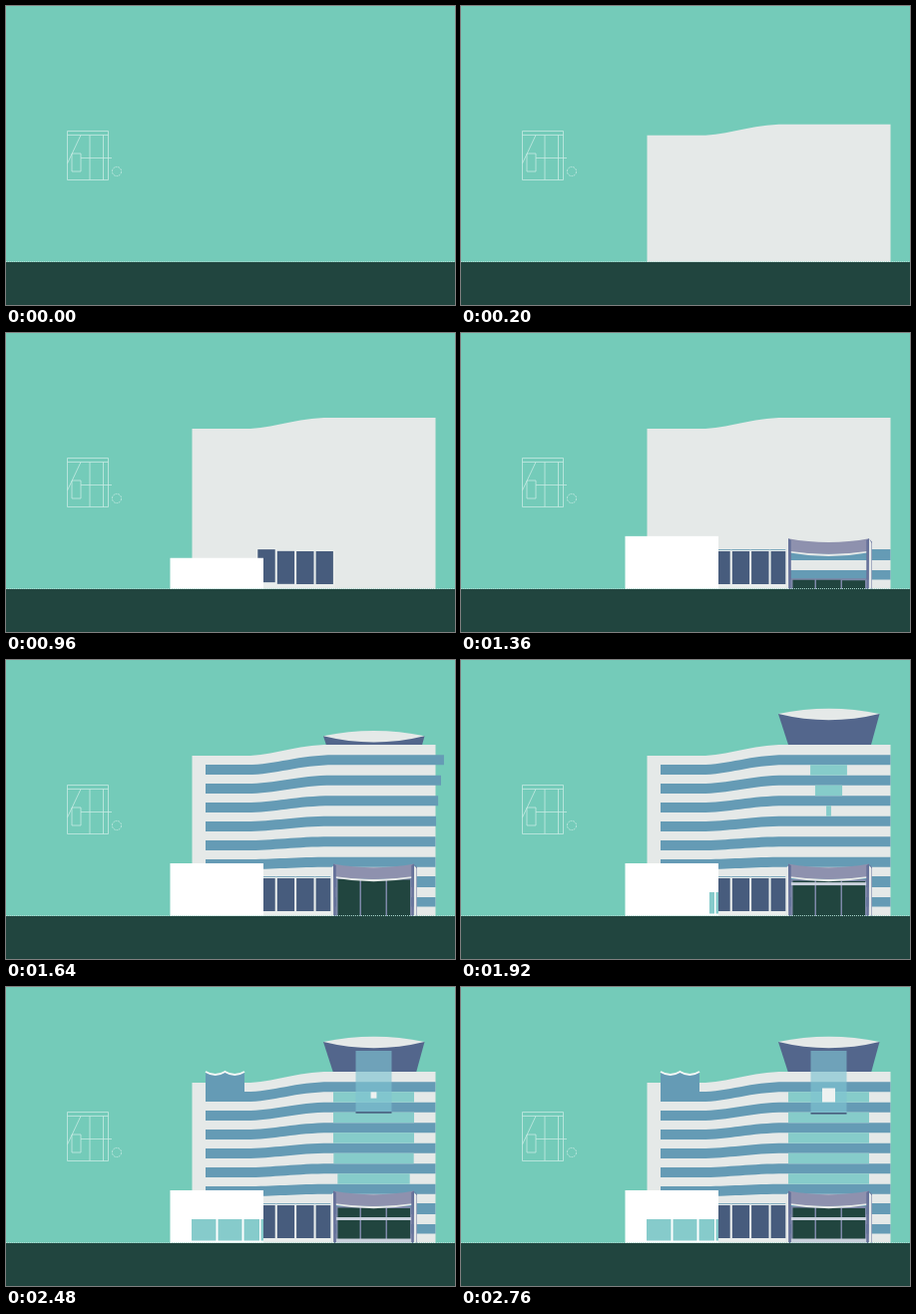
An HTML page for the animation above (3.6 s loop, 450x300 px).

```html
<!DOCTYPE html>
<html lang="en">
<head>
<meta charset="utf-8">
<title>Building</title>
<style>
html, body { margin: 0; width: 100%; height: 100%; overflow: hidden; background: #74cbb9; }
svg { display: block; width: 100vw; height: 100vh; }
</style>
</head>
<body>
<svg id="stage" viewBox="0 0 450 300">
  <defs>
    <clipPath id="air"><rect width="450" height="257"/></clipPath>
    <clipPath id="roofClip"><rect x="195" y="60" width="50" height="46"/></clipPath>
    <clipPath id="blockClip"><rect x="165" y="204" width="93" height="52"/></clipPath>
    <clipPath id="doorClip"><path d="M330 216Q368.500 225 407 216V257H330Z"/></clipPath>
  </defs>
  <rect width="450" height="300" fill="#74cbb9"/>
  <g fill="none" stroke="#e4f5f1" stroke-width=".8" opacity=".75">
    <path d="M61.500 125.500H102.500V174.500H61.500ZM61.500 129.500H102.500M84 129.500V174.500M97.500 129.500V174.500M75 129.500L61.500 158M66 148H75V166H66ZM75 152.500H106"/>
    <circle cx="111" cy="166" r="4.600" stroke-dasharray="2 .8"/>
  </g>
  <g clip-path="url(#air)">
    <g id="tower">
      <path d="M318 55L328 86H411L419.500 55Z" fill="#53668c"/>
      <path d="M318 55Q368.700 44.500 419.500 55Q368.700 67.500 318 55Z" fill="#e5e9e8"/>
    </g>
    <path id="body" d="M186.500 96H240C268 96 290 85 325 85H430.500V290H186.500Z" fill="#e5e9e8"/>
    <g clip-path="url(#roofClip)">
      <g id="roof">
        <path d="M200 85q9.750 6 19.500 0q9.750 6 19.500 0V108H200Z" fill="#659bb5"/>
        <path d="M200 85q9.750 6 19.500 0q9.750 6 19.500 0" fill="none" stroke="#f4f7f6" stroke-width="2"/>
      </g>
    </g>
    <g id="stripes" fill="#659bb5"></g>
    <g id="glass" fill="#86ccca"></g>
    <g id="windows"></g>
    <g id="doors" clip-path="url(#doorClip)">
      <g id="leaves">
        <rect x="330.500" y="220" width="76" height="50" fill="#7d88a8"/>
        <path d="M332.500 221.500H354.500V270H332.500ZM356 221.500H380.500V270H356ZM382 222H405V270H382Z" fill="#21453f"/>
      </g>
      <rect id="bar" x="330.500" width="76" height="3" fill="#c9d0dc"/>
      <rect id="sill" x="330.500" width="76" height="5" fill="#c9d0dc"/>
    </g>
    <g id="porch">
      <path d="M325.300 209L328.500 206V280H325.300ZM408.500 206L411.700 209V280H408.500Z" fill="#e5e9e8"/>
      <path d="M330 217.500Q368.500 224.500 407 217.500" fill="none" stroke="#e5e9e8" stroke-width="2.500"/>
      <path d="M328 204.500Q368.500 212 409 204.500V217Q368.500 223 328 217Z" fill="#8e91ae"/>
      <path d="M328 204.500L330.800 206V280H328.300ZM409 204.500L406.300 206V280H408.700ZM409 204.500L412 208V280H411.500V209Z" fill="#66719a"/>
    </g>
    <rect id="block" x="164.500" y="204" width="93.500" height="80" fill="#fff"/>
    <g id="glazing" clip-path="url(#blockClip)">
      <path id="panes" d="M186 233H210.500V254.500H186ZM212.500 233H236.500V254.500H212.500ZM238.500 233H275V254.500H238.500Z" fill="#86cbcb"/>
      <rect x="254" y="230" width="1.500" height="26" fill="#fff"/>
    </g>
    <g id="panel">
      <rect id="pane" x="350.500" y="64" width="36" fill="#7fc3d2" fill-opacity=".65"/>
      <rect id="edge" x="350.500" width="36" height="1.600" fill="#475c7d"/>
    </g>
    <rect id="hatch" x="-6.500" y="-7" width="13" height="14" fill="#eef2f1"/>
  </g>
  <rect y="257" width="450" height="43" fill="#21453f"/>
  <path d="M0 256.500H450" stroke="#a9d6cd" stroke-width="1" stroke-dasharray="1 1"/>
</svg>
<script>
const LOOP = 3600, STEP = 40, END = 2760;
const el = id => document.getElementById(id);
const set = (node, attrs) => { for (const k in attrs) node.setAttribute(k, attrs[k]); };
const add = (parent, tag, attrs) => {
  const node = document.createElementNS("http://www.w3.org/2000/svg", tag);
  set(node, attrs);
  return parent.appendChild(node);
};
const show = (id, on) => set(el(id), { visibility: on ? "visible" : "hidden" });
const part = (t, start, length) => Math.min(1, Math.max(0, (t - start) / length));
const back = (t, start, length) => {
  const u = part(t, start, length) - 1;
  return 1 + 2.15 * u ** 3 + 1.15 * u * u;
};
const out = (t, start, length) => 1 - (1 - part(t, start, length)) ** 3;
const rise = (id, t, start, length, dist) => lift(el(id), t, start, length, dist);
function lift(node, t, start, length, dist) {
  set(node, {
    transform: `translate(0 ${dist * (1 - back(t, start, length))})`,
    visibility: t > start ? "visible" : "hidden"
  });
}

// Stripes flatten from the roof wave towards the ground.
const stripes = [];
for (let i = 0; i < 6; i++) {
  const l = 105 + 19 * i, r = 95.2 + 20.5 * i, h = 10;
  const node = add(el("stripes"), "path", {
    d: `M200 ${l}H240C268 ${l} 290 ${r} 325 ${r}H430.500V${r + h}H325C290 ${r + h} 268 ${l + h} 240 ${l + h}H200Z`
  });
  stripes.push({ node, x: 200, start: 1450 - 16 * i, length: 250 });
}
[217, 238].forEach((y, i) => {
  const node = add(el("stripes"), "rect", { x: 258, y, width: 172.5, height: i ? 9.5 : 11 });
  stripes.push({ node, x: 258, start: 1140 - 15 * i, length: 220 });
});

const glass = [1812, 1845, 1908, 2008, 2170].map((start, i) => ({
  start, node: add(el("glass"), "rect", { y: 105.2 + 20.5 * i, height: 10.5 })
}));

const windows = [0, 1, 2, 3].map(i => {
  const x = 310.5 - 19.4 * i, node = add(el("windows"), "g", {});
  add(node, "rect", { x: x - 1.7, y: 217.8, width: 20.8, height: 50, fill: "#e9edec" });
  add(node, "rect", { x, y: 219, width: 17.4, height: 33, fill: "#475c7d" });
  return { node, start: [285, 418, 560, 684][i] };
});

function draw(t) {
  rise("body", t, 30, 595, 172);
  windows.forEach(w => lift(w.node, t, w.start, 430, 38));
  rise("block", t, 866, 520, 53);
  rise("porch", t, 1180, 430, 52);
  rise("leaves", t, 1325, 420, 38);
  rise("tower", t, 1592, 400, 37);
  rise("roof", t, 1950, 300, 24);

  for (const s of stripes) {
    const k = Math.max(0, back(t, s.start, s.length));
    set(s.node, { transform: `translate(${s.x} 0) scale(${k} 1) translate(${-s.x} 0)` });
  }
  for (const g of glass) {
    const w = 81 * out(t, g.start, 590);
    set(g.node, { x: 368.5 - w / 2, width: w });
  }

  set(el("bar"), { y: 214 + 17 * out(t, 1830, 400) });
  show("bar", t > 1830);
  set(el("sill"), { y: 257 - 4.5 * out(t, 1920, 300) });

  set(el("panes"), { transform: `translate(${72 * (1 - out(t, 1897, 525))} 0)` });
  show("glazing", t > 1897);

  const h = 63 * out(t, 2100, 500);
  set(el("pane"), { height: h });
  set(el("edge"), { y: 63 + h });
  show("panel", h > 0);
  set(el("hatch"), { transform: `translate(368.500 108.500) scale(${back(t, 2440, 310)})` });
}

function tick(now) {
  const t = now % LOOP;
  draw(Math.min(END, Math.floor(t / STEP) * STEP));
  requestAnimationFrame(tick);
}
draw(0);
requestAnimationFrame(tick);
</script>
</body>
</html>
```
